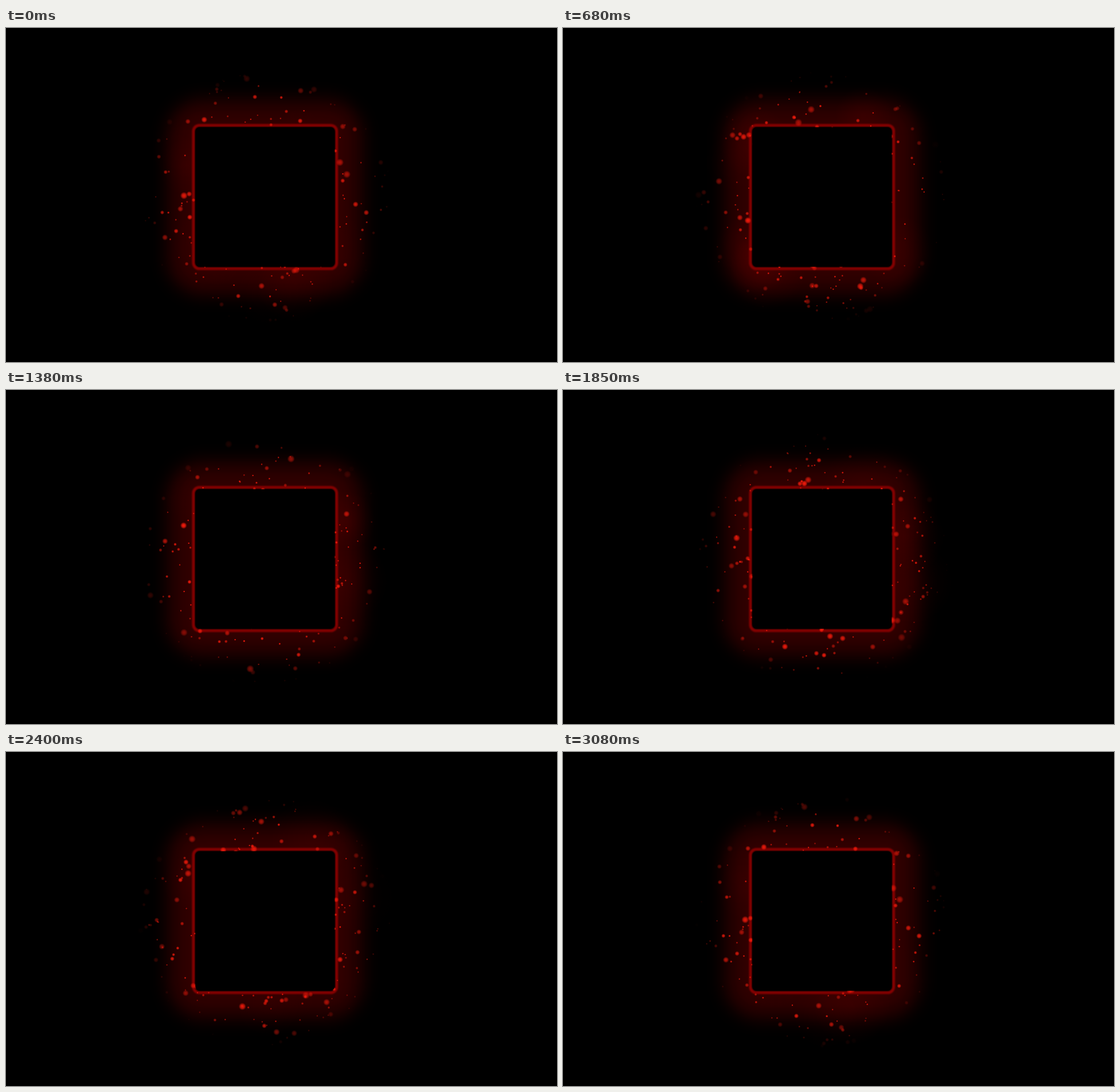
Write an HTML page with a canvas that moves like this. It is 961 by 582 pixels and loops after 3.15 s.

```html
<!DOCTYPE html>
<html>
<head>
<meta charset="utf-8">
<style>
html, body { margin: 0; width: 100%; height: 100%; overflow: hidden; background: #000; }
canvas { display: block; }
</style>
</head>
<body>
<canvas id="stage" width="961" height="582"></canvas>
<script>
const ctx = document.getElementById('stage').getContext('2d');
const LOOP = 3150, STEPS = 46, CX = 451.8, CY = 294.5;
const SPEED = 7.4, SPAN = SPEED * STEPS; // radial travel per step and per loop
const INNER = 118, OUTER = 220;

let seed = 7331;
function rand() {
  seed = (seed + 0x6D2B79F5) | 0;
  let n = Math.imul(seed ^ seed >>> 15, 1 | seed);
  n = n + Math.imul(n ^ n >>> 7, 61 | n) ^ n;
  return ((n ^ n >>> 14) >>> 0) / 4294967296;
}

const make = (count, build) => Array.from({ length: count }, build);

const sparks = make(600, () => ({
  angle: rand() * Math.PI * 2,
  start: rand() * SPAN,
  size: 1.3 + 4.2 * rand() ** 3.2,
  light: 0.5 + 0.5 * rand()
}));

const flares = make(14, (_, i) => ({
  angle: i * 2.4 + rand(),
  peak: rand() * STEPS,
  radius: 50 + 25 * rand()
}));

function box(half, radius) {
  ctx.beginPath();
  ctx.roundRect(CX - half, CY - half, half * 2, half * 2, radius);
}

function blob(angle, dist, radius, rgb, alpha, core) {
  const x = CX + Math.cos(angle) * dist, y = CY + Math.sin(angle) * dist;
  const g = ctx.createRadialGradient(x, y, 0, x, y, radius);
  g.addColorStop(0, `rgba(${rgb},${alpha})`);
  g.addColorStop(core, `rgba(${rgb},${alpha * 0.75})`);
  g.addColorStop(1, `rgba(${rgb},0)`);
  ctx.fillStyle = g;
  ctx.fillRect(x - radius, y - radius, radius * 2, radius * 2);
}

function glowLayer(half, radius, blur, alpha) {
  ctx.filter = `blur(${blur}px)`;
  ctx.fillStyle = `rgba(255,0,0,${alpha})`;
  box(half, radius);
  ctx.fill();
  ctx.filter = 'none';
}

function drawGlow(step) {
  glowLayer(176, 70, 13, 0.11);
  glowLayer(150, 35, 16, 0.1);
  for (const f of flares) {
    let d = step - f.peak;
    d -= STEPS * Math.round(d / STEPS);
    const alpha = 0.07 * Math.exp(-d * d / 25);
    if (alpha > 0.003) blob(f.angle, 155 + d * 2, f.radius, '255,0,0', alpha, 0.3);
  }
}

function drawFrame() {
  ctx.fillStyle = '#000';
  box(124.8, 10);
  ctx.fill();
  ctx.filter = 'blur(1px)';
  ctx.strokeStyle = '#850000';
  ctx.lineWidth = 5;
  ctx.stroke();
  ctx.filter = 'none';
}

function drawSparks(step) {
  for (const s of sparks) {
    const dist = (s.start + SPEED * step) % SPAN;
    if (dist < INNER || dist > OUTER) continue;
    const alpha = s.light * Math.min(1, (OUTER - dist) / 50);
    blob(s.angle, dist, s.size * 1.25, '255,28,12', alpha, 0.5);
  }
}

let shown = -1;
function tick() {
  const t = performance.now() % LOOP;
  const step = Math.min(STEPS - 1, Math.floor((t + 9) * STEPS / LOOP));
  if (step !== shown) {
    shown = step;
    ctx.fillStyle = '#000';
    ctx.fillRect(0, 0, 961, 582);
    drawGlow(step);
    drawFrame();
    drawSparks(step);
    ctx.fillStyle = '#000';
    box(121.5, 8);
    ctx.fill();
  }
  requestAnimationFrame(tick);
}
tick();
</script>
</body>
</html>
```
